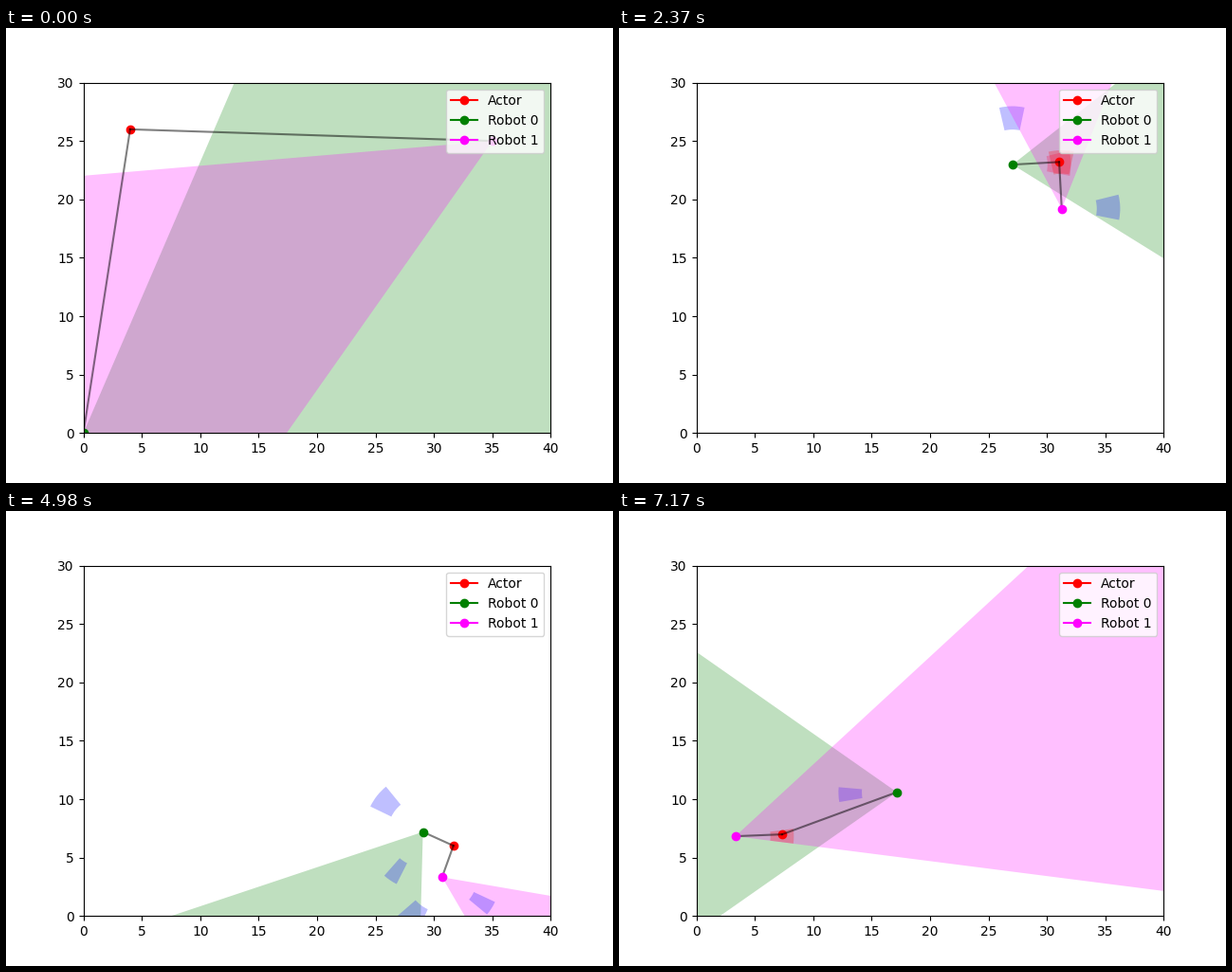
A matplotlib script that plays this animation: 640 by 480 pixels, repeating every 7200 ms.

```python
import numpy as np
import matplotlib.pyplot as plt
from matplotlib.animation import FuncAnimation
from matplotlib.patches import Polygon, Wedge

FRAMES, INTERVAL = 240, 30
DIST = 4
TURNS = [0, 75, 165, 240]
CORNERS = np.array([(4, 26), (31, 24), (32, 6), (7, 7)], float)

ticks = np.arange(FRAMES)
actor = np.column_stack([np.interp(ticks, TURNS, CORNERS[:, k]) for k in (0, 1)])
steps = np.diff(CORNERS, axis=0)
headings = np.arctan2(steps[:, 1], steps[:, 0])
heading = headings[np.searchsorted(TURNS[1:3], ticks)]


def track(bearing, fixed, legs):
    """Station around the actor, with straight legs between some ticks."""
    angle = heading + np.radians(bearing)
    path = actor + DIST * np.column_stack([np.cos(angle), np.sin(angle)])
    for tick, point in fixed.items():
        path[tick] = point
    for a, b in legs:
        path[a:b + 1] = np.linspace(path[a], path[b], b - a + 1)
    return path


TURN_LEGS = [(75, 78), (165, 168)]
path0 = track(-90, {0: (0, 0), 30: (12.6, 10.28), 51: (21.05, 18.16), 57: (23.5, 20.55)},
              [(0, 30), (30, 51), (51, 57), (57, 75)] + TURN_LEGS)
path0[210:] = path0[210]
path1 = track(np.where(ticks > 120, 4.6, 0), {0: (35, 25)},
              [(0, 30), (120, 150)] + TURN_LEGS)

# Views: first tick, last tick, centre and half width in degrees
VIEWS = [(30, 120, -2.6, 12.5), (57, 210, -91.8, 12.5), (150, 240, 2.4, 7.3)]


def in_turn(i):
    return any(a < i <= b for a, b in TURN_LEGS)


def ray(angle, length=200):
    return length * np.array([np.cos(angle), np.sin(angle)])


class Robot:
    def __init__(self, ax, name, color, path, fov, pan, watch):
        self.path, self.half, self.pan, self.watch = path, np.radians(fov / 2), pan, watch
        self.cone = ax.add_patch(Polygon(np.zeros((3, 2)), fc=color, ec='none', alpha=0.25))
        self.sectors = [ax.add_patch(Wedge((0, 0), 5, 0, 1, width=2, ec='none', alpha=0.25))
                        for _ in VIEWS]
        self.link, = ax.plot([], [], color='black', alpha=0.5, zorder=2.1)
        self.dot, = ax.plot([], [], '-o', color=color, label=name, zorder=2.2)

    def update(self, i):
        pos = self.path[i]
        move = pos - self.path[i - 1]
        back = np.arctan2(move[1], move[0]) + np.pi

        watching = self.watch[0] <= i <= self.watch[1] and not in_turn(i)
        look = back + (np.radians(self.pan) if watching else 0)
        self.cone.set_xy([pos, pos + ray(look - self.half), pos + ray(look + self.half)])

        to_actor = actor[i] - pos
        gap = np.hypot(*to_actor)
        bearing = np.degrees(np.arctan2(to_actor[1], to_actor[0]))
        for sector, (start, stop, centre, half) in zip(self.sectors, VIEWS):
            mid = np.degrees(back) + centre
            off = (bearing - mid + 180) % 360 - 180
            hit = abs(off) <= half and 3 <= gap <= 5
            sector.set_center(tuple(pos))
            sector.set_theta1(mid - half)
            sector.set_theta2(mid + half)
            sector.set_facecolor('red' if hit else 'blue')
            sector.set_visible(start <= i <= stop)

        self.link.set_data(*zip(actor[i], pos))
        self.dot.set_data([pos[0]], [pos[1]])


fig, ax = plt.subplots(figsize=(6.4, 4.8), dpi=100)
ax.set_aspect('equal')
ax.set_xlim(0, 40)
ax.set_ylim(0, 30)
ax.set_xticks(range(0, 41, 5))
ax.set_yticks(range(0, 31, 5))

actor_dot, = ax.plot([], [], '-o', color='red', label='Actor')
robots = [Robot(ax, 'Robot 0', 'green', path0, 70, -90, (57, 210)),
          Robot(ax, 'Robot 1', 'magenta', path1, 50, 20, (150, 240))]
ax.legend(handles=[actor_dot] + [r.dot for r in robots], loc='upper right')


def update(i):
    actor_dot.set_data([actor[i, 0]], [actor[i, 1]])
    for robot in robots:
        robot.update(i)
    return []


anim = FuncAnimation(fig, update, frames=FRAMES, init_func=lambda: update(0),
                     interval=INTERVAL, repeat=True, repeat_delay=0)
plt.show()
```
